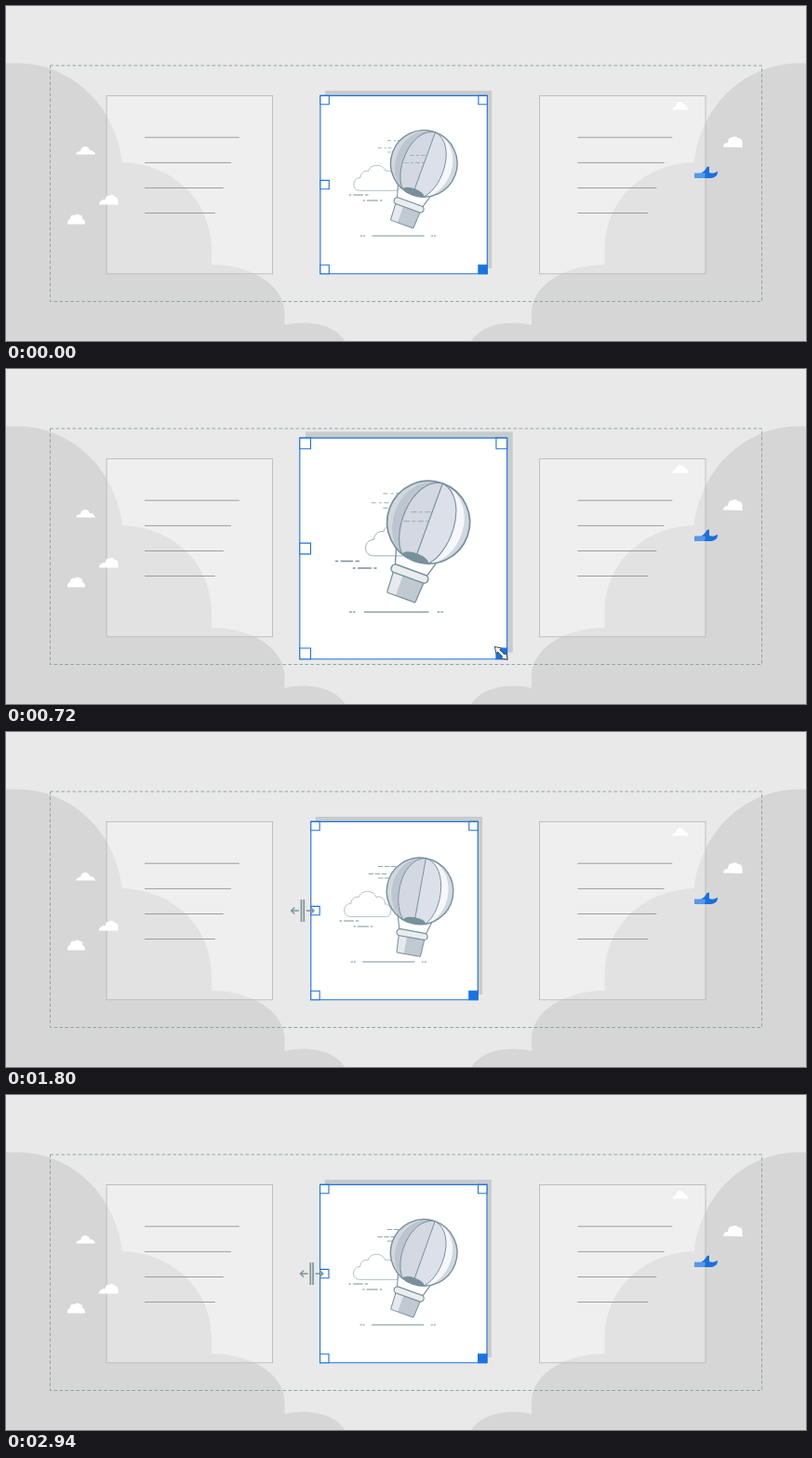
Animation, 860 px wide and 360 px high, one loop 3000 ms. Source, as an HTML page:

```html
<!DOCTYPE html>
<html lang="en">
<head>
<meta charset="utf-8">
<title>Resizing a card</title>
<style>
  html, body { margin: 0; width: 100%; height: 100%; overflow: hidden; background: #e9e9e9; }
  svg { display: block; width: 860px; height: 360px; }
  .line { fill: none; stroke: #78909c; }
  .frame { fill: #fff; stroke: #1a73e0; stroke-width: 1.1; vector-effect: non-scaling-stroke; }
  .handle .frame { width: 9.4px; height: 9.4px; }
  .handle .active { fill: #1a73e0; }
</style>
</head>
<body>
<svg viewBox="0 0 860 360" xmlns="http://www.w3.org/2000/svg">
  <defs>
    <path id="hills" fill="#d6d6d6" d="M-6 61.5H12C70 61.5 118 107 125 168C180 170 221 209 221 262V278C265 278 299.5 301 299.5 330V343C324 337 354 342 365 361H-6Z"/>
    <g id="page">
      <rect x=".3" y=".3" width="178.5" height="191.3" fill="#fff" fill-opacity=".28" stroke="#b9bbbc" stroke-width=".9"/>
      <path d="M41.3 45H143M41.3 72.2H134.2M41.3 99.3H126M41.3 126.3H117" stroke="#9c9e9f"/>
    </g>
    <clipPath id="envelope"><circle cy="36" r="36"/></clipPath>
  </defs>

  <rect width="860" height="360" fill="#e9e9e9"/>
  <use href="#hills"/>
  <use href="#hills" transform="translate(864.5) scale(-1 1)"/>
  <use href="#page" x="107.8" y="96.2"/>
  <use href="#page" x="573.2" y="96.2"/>
  <rect x="47.5" y="64" width="765" height="253.5" fill="none" stroke="#91a3a7" stroke-dasharray="3.5 2.5"/>

  <g fill="#fff">
    <path d="M75 159.5Q76 156 80 156Q81 151 85 151Q89 151 90 155Q95 155 96 159.5Z"/>
    <path d="M100 213.5Q100 208 107 208Q107 203 111 204Q114 201 117 205Q120 205 120.5 209V213.5Z"/>
    <path d="M66 234.5Q66 229 69 229Q69 224 73 225Q77 222 80 225Q83 225 82 229Q85 229 85 234.5Z"/>
    <path d="M716 111.5Q717 108 720 108Q721 103 725 103Q729 104 730 107Q733 108 734 111.5Z"/>
    <path d="M771 151.5Q771 147 776 147Q776 141 781 141Q785 139 787 142Q791 142 791.5 146V152Z"/>
  </g>
  <path d="M740 179.5H752V185H740Z" fill="#5698e8"/>
  <path d="M747 179.5Q751 178 753.5 173L756 172.5V179Q761 181 765 177.5Q765 185 757 185H751L752 180Z" fill="#1a6fdb"/>

  <g id="card">
    <rect x="343" y="91" width="179.2" height="191" fill="#cacbcc"/>
    <rect class="frame" x="337.9" y="96.4" width="179.4" height="191.3"/>

    <path id="cloud" class="line" stroke-opacity=".7" stroke-width=".8" d="M380.5 198.4C371.5 198.4 371.5 184.5 381 184.3C381.5 178.5 386 176.6 389.5 177.4C391.5 169.5 405 169 408 177.4C413 176 418 179 417.5 184.8C426 185.5 426 198.4 418.5 198.4Z"/>
    <path class="line" stroke-width="1.1" d="M368.7 203H371.2M373.2 203H384M386 203H389.5M383.7 209H386M388 209H400M402 209H404.5"/>
    <path class="line" stroke-width="1.1" d="M380.8 247H383M384 247H386M393.5 247H449.5M457 247H459M460 247H462.2"/>
    <path id="wind" class="line" stroke-width=".8" d="M410 144.5H430M399.7 152.5H420M410 157H421.5"/>

    <g id="balloon">
      <path class="line" stroke-width="1.1" d="M-19 65L-14 82M19 65L14 82"/>
      <g clip-path="url(#envelope)">
        <circle cy="36" r="36" fill="#d2d8e0"/>
        <path d="M0 0C-39 4 -39 62 -8 72H0Z" fill="#bdc6cf"/>
        <path d="M0 0C39 4 39 62 8 72H0Z" fill="#f6f7fa"/>
        <path d="M0 0C-28 5 -28 60 -9 72H9C28 60 28 5 0 0Z" fill="#dce0e9"/>
        <path d="M0 0C-28 5 -28 60 -9 72H0Z" fill="#d3d8e1"/>
        <path class="line" stroke-width=".9" d="M0 0C-28 5 -28 60 -9 72M0 0C28 5 28 60 9 72M0 0V68"/>
        <ellipse cy="69.5" rx="12" ry="4.8" fill="#78909c"/>
      </g>
      <circle class="line" cy="36" r="35.8" stroke-width="1.4"/>
      <path d="M-14 86H14L13 104.300Q13 105.300 12 105.300H-12Q-13 105.300 -13 104.300Z" fill="#c1c9d1"/>
      <path d="M-14 86H-5V105.300H-12Q-13 105.300 -13 104.300Z" fill="#e6eaed"/>
      <path class="line" d="M-14 86H14L13 104.300Q13 105.300 12 105.300H-12Q-13 105.300 -13 104.300Z"/>
      <rect x="-16.8" y="79.8" width="33.600" height="7.2" rx="3.6" fill="#e9edef" stroke="#78909c" stroke-width="1.2"/>
    </g>
    <path id="gust" class="line" stroke-opacity=".75" stroke-width=".7" stroke-dasharray="5 2 3 2" d="M434 160.5H453M428 168.5H449"/>

    <g class="handle">
      <rect class="frame" x="337.9" y="96.4"/>
      <rect class="frame" x="507.9" y="96.4"/>
      <rect class="frame" x="337.9" y="187.4"/>
      <rect class="frame" x="337.9" y="278.3"/>
      <rect class="frame active" x="507.9" y="278.3"/>
    </g>
  </g>

  <path id="diagonal" fill="#fff" stroke="#4a4f52" stroke-linejoin="round" d="M-9.700 0L-3.500 -4V-1.600H3.500V-4L9.700 0L3.500 4V1.600H-3.500V4Z"/>
  <g id="sideways" fill="none" stroke="#7d959b" stroke-width="1.5">
    <path d="M-1.400 -12V12M1.400 -12V12" stroke-width="1.7"/>
    <path d="M-4 0H-12M-8.600 -3.500L-12.200 0L-8.600 3.500M4 0H12M8.600 -3.500L12.200 0L8.600 3.500"/>
  </g>
</svg>
<script>
const LOOP = 3000, STEP = 60;
const ORIGIN = { x: 429.2, y: 188.4 };
const GROWTH = 0.242, SLIDE = 24.2, TILT = 20;
const part = id => document.getElementById(id);
const [card, cloud, wind, balloon, gust, diagonal, sideways] =
  ["card", "cloud", "wind", "balloon", "gust", "diagonal", "sideways"].map(part);

const ramp = (t, from, to) => Math.min(1, Math.max(0, (t - from) / (to - from)));
const place = (el, transform) => el.setAttribute("transform", transform);
const fade = (el, opacity) => el.setAttribute("opacity", opacity);

function draw(t) {
  const grow = ramp(t, 110, 720) - ramp(t, 740, 1340);
  const slide = ramp(t, 1505, 2210) - ramp(t, 2210, 2950);
  const scale = 1 + GROWTH * grow;
  const dx = -SLIDE * slide;
  const sliding = t >= 1500;

  place(card, `translate(${ORIGIN.x + dx} ${ORIGIN.y}) scale(${scale}) translate(${-ORIGIN.x} ${-ORIGIN.y})`);
  place(cloud, `translate(${21 * grow} 0)`);
  place(balloon, `translate(461.6 135.5) rotate(${TILT + 0.96 * dx})`);
  wind.setAttribute("stroke-dasharray", sliding ? "5.5 1.5" : "4 3 2 2");
  fade(wind, sliding ? 1 : 0.75);
  fade(gust, sliding ? 0 : 1);

  // The corner cursor follows its handle, then drifts off and fades.
  const leave = ramp(t, 1340, 1480);
  const x = ORIGIN.x + 83 * scale + 12 * leave;
  const y = ORIGIN.y + 94.2 * scale + 16 * leave;
  place(diagonal, `translate(${x} ${y}) rotate(45)`);
  fade(diagonal, t < 60 ? 0 : 1 - leave);

  place(sideways, `translate(${329 + dx} 192)`);
  fade(sideways, sliding ? 1 : 0);
}

const start = performance.now();
function tick() {
  const t = (performance.now() - start) % LOOP;
  draw(Math.floor(t / STEP) * STEP);
  requestAnimationFrame(tick);
}
draw(0);
requestAnimationFrame(tick);
</script>
</body>
</html>
```
